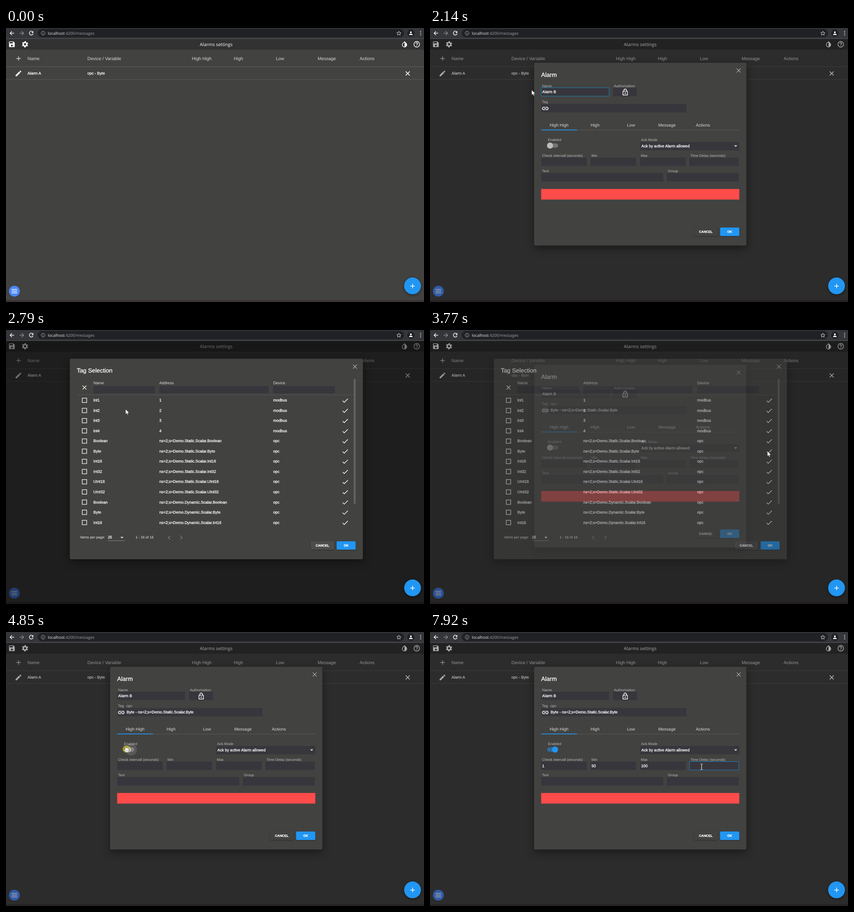
Recreate the animation shown at these times as an HTML page. Size 923 by 606 pixels, loop 8 s.

```html
<!DOCTYPE html>
<html lang="en">
<head>
<meta charset="utf-8">
<title>Alarms settings</title>
<style>
  html, body { margin: 0; width: 100%; height: 100%; overflow: hidden; background: #424241; }
  svg { display: block; width: 923px; height: 606px; }
  text { font-family: "Liberation Sans", Arial, sans-serif; white-space: pre; text-rendering: geometricPrecision; }
  .ui { font-family: "Open Sans", "Noto Sans", sans-serif; }
  .value { stroke: #fff; stroke-width: .3; }
  .dialog { transform-box: fill-box; transform-origin: center; }
  .dialog > .panel { filter: drop-shadow(0 7px 9px rgba(0, 0, 0, .4)); }
</style>
</head>
<body>
<svg id="stage" viewBox="0 0 923 606"></svg>
<script>
const LOOP = 8000, BLUE = '#2196f3', FIELD = '#37363c', LABEL = '#b9b9b9';
const stage = document.getElementById('stage');
const $ = id => document.getElementById(id);

// Markup helpers
const text = (x, y, s, size = 8.6, fill = '#fff', extra = '') =>
  `<text x="${x}" y="${y}" font-size="${size}" fill="${fill}" ${extra}>${s}</text>`;
const value = (x, y, s, size = 8.6) => text(x, y, s, size, '#fff', 'class="value"');
const label = (x, y, s) => text(x, y, s, 8, LABEL);
const middle = (x, y, s, size, fill, extra = '') =>
  text(x, y, s, size, fill, 'text-anchor="middle" ' + extra);
const rect = (x, y, x2, y2, fill, extra = '') =>
  `<rect x="${x}" y="${y}" width="${x2 - x}" height="${y2 - y}" fill="${fill}" ${extra}/>`;
const circle = (x, y, r, fill, extra = '') => `<circle cx="${x}" cy="${y}" r="${r}" fill="${fill}" ${extra}/>`;
const line = (d, w = 1.4, color = '#fff', extra = '') =>
  `<path d="${d}" fill="none" stroke="${color}" stroke-width="${w}" ${extra}/>`;
const cross = (x, y, r, w, color) => line(`M${x - r} ${y - r}l${2 * r} ${2 * r}m0 ${-2 * r}l${-2 * r} ${2 * r}`, w, color);
const plus = (x, y, r, w, color) => line(`M${x - r} ${y}h${2 * r}M${x} ${y - r}v${2 * r}`, w, color);
const icon = (x, y, body, scale = .7) => `<g transform="translate(${x} ${y}) scale(${scale}) translate(-12 -12)">${body}</g>`;
const solid = d => `<path d="${d}" fill="#fff" fill-rule="evenodd"/>`;
const caretDown = (x, y) => `<path d="M${x - 3.5} ${y}h7l-3.5 3.5z" fill="#ddd"/>`;
const button = (x, y, x2, s, fill) =>
  rect(x, y, x2, y + 18.6, fill, 'rx="2" style="filter:drop-shadow(0 1px 1px rgba(0,0,0,.35))"') +
  middle((x + x2) / 2, y + 12, s, 7.15, '#fff', 'font-weight="bold" class="value"');

const browserBar = () =>
  rect(0, 0, 923, 23, '#35363a') + rect(0, 23, 923, 24, '#56575a') +
  rect(70, 2, 879, 20.5, '#202124', 'rx="9.2"') +
  line('M18 11.5H9m4.3-4.3L9 11.5l4.3 4.3', 1.5, '#eee') +
  line('M30 11.5h9m-4.3-4.3l4.3 4.3-4.3 4.3', 1.5, '#85868a') +
  line('M59 8.6A4.2 4.2 0 1 0 59.8 12.6', 1.5, '#eee') +
  '<path d="M60.4 6.6v4.4h-4.4z" fill="#eee"/>' +
  circle(82, 11.5, 4.2, 'none', 'stroke="#a5a8ad"') + line('M82 11v3M82 8.8v1.1', 1, '#a5a8ad') +
  text(92.5, 14.6, 'localhost<tspan fill="#9aa0a6">:4200/messages</tspan>', 8.8, '#f0f0f0', 'class="ui"') +
  line('M867.5 7l1.4 3 3.2.4-2.4 2.2.7 3.2-2.9-1.6-2.9 1.6.7-3.2-2.4-2.2 3.2-.4z', 1, '#ddd') +
  circle(894, 11.5, 8, '#1f2023') + circle(894, 9.6, 2, '#fff') +
  '<path d="M890 15.4q0-2.8 4-2.8t4 2.8z" fill="#fff"/>' +
  [7.7, 11.5, 15.3].map(y => circle(915.5, y, 1.1, '#ddd')).join('');

const page = () =>
  rect(0, 24, 923, 606, '#424241') + rect(0, 24, 923, 48, '#323232') + rect(0, 602, 923, 606, '#3a3336') +
  icon(13, 36, solid('M17 3H5a2 2 0 0 0-2 2v14a2 2 0 0 0 2 2h14a2 2 0 0 0 2-2V7zM12 19a3 3 0 1 1 0-6 3 3 0 0 1 0 6zM15 9H5V5h10z')) +
  icon(42, 36, circle(12, 12, 5.4, 'none', 'stroke="#fff" stroke-width="4"') +
    circle(12, 12, 8, 'none', 'stroke="#fff" stroke-width="3.8" pathLength="12" stroke-dasharray="1 1" transform="rotate(15 12 12)"')) +
  icon(880, 36, solid('M12 2.3L6.3 8a8 8 0 1 0 11.4 0zM12 19.6a6 6 0 0 1-4.2-10.3L12 5.1z')) +
  circle(907, 36, 6.2, 'none', 'stroke="#fff" stroke-width="1.4"') +
  line('M905 34.6a2 2 0 1 1 3.2 1.5q-1.2.8-1.2 2M907 38.7v1.4', 1.3) +
  middle(464.2, 39.7, 'Alarms settings', 10.1, '#fff', 'class="ui"') +
  plus(27.7, 67.5, 4.9, 1.3, '#d8d8d8') +
  [[47.5, 'Name'], [179.8, 'Device / Variable'], [410.5, 'High High'], [503, 'High'], [596, 'Low'], [688.3, 'Message'], [781, 'Actions']]
    .map(([x, s]) => text(x, 70.8, s, 9.95, '#d8d8d8')).join('') +
  rect(0, 85, 923, 86, '#5b5b5a') + rect(0, 113.3, 923, 114.3, '#5b5b5a') +
  icon(27.5, 100.5, solid('M3 17.2V21h3.8L17.8 9.9l-3.7-3.7zM20.7 7a1 1 0 0 0 0-1.4l-2.3-2.3a1 1 0 0 0-1.4 0l-1.9 1.8 3.8 3.8z')) +
  value(47.5, 103.1, 'Alarm A') + value(179.8, 103.1, 'opc - Byte') +
  cross(887, 100.5, 4.4, 1.6, '#fff') +
  circle(18.5, 582, 12, '#4a87f7') + line('M12.3 578.3h12.4M12.3 582h12.4M12.3 585.7h12.4', 1.4);

const fab = () =>
  circle(897.7, 570.3, 18.5, BLUE, 'style="filter:drop-shadow(0 2px 3px rgba(0,0,0,.4))"') +
  circle(897.7, 570.3, 18.5, '#fff', 'id="fabRipple"') + plus(897.7, 570.7, 4.9, 1.4, '#fff');

// Editable fields: typed = [time, content], caret = visible intervals
const fields = [
  { id: 'name', x: 245.5, y: 132, x2: 395.5, focus: [790, 2450],
    typed: [[1330, 'A'], [1410, 'Al'], [1490, 'Ala'], [1580, 'Alar'], [1660, 'Alarm'], [1740, 'Alarm '], [1900, 'Alarm B']],
    caret: [[790, 1080], [1330, 1900]] },
  { id: 'interval', x: 245.5, y: 286.5, x2: 346, focus: [5260, 5820], typed: [[5500, '1']], caret: [[5260, 5740]] },
  { id: 'min', x: 354.5, y: 286.5, x2: 455, focus: [5820, 6800], typed: [[6480, '5'], [6640, '50']], caret: [[5820, 6320], [6480, 6720]] },
  { id: 'max', x: 464, y: 286.5, x2: 564.5, focus: [6800, 7700], typed: [[7280, '1'], [7520, '10'], [7600, '100']], caret: [[6800, 7030]] },
  { id: 'delay', x: 573, y: 286.5, x2: 682, focus: [7700, LOOP], typed: [], caret: [[7700, 7900]] }
];

const alarmDialog = () =>
  rect(230, 77, 698.5, 481, '#424241', 'rx="3" class="panel"') +
  value(245.5, 107.7, 'Alarm', 13.2) + cross(681.5, 94, 4.3, 1.2, '#b5b5b5') +
  [[247.5, 130.6, 'Name'], [406, 130.6, 'Authorization'], [247.3, 166.2, 'Tag'], [260.5, 250, 'Enabled'], [466.3, 250, 'Ack Mode'],
   [247.5, 284.6, 'Check intervall (seconds)'], [356.5, 284.6, 'Min'], [465.5, 284.6, 'Max'], [575, 284.6, 'Time Delay (seconds)'],
   [247.5, 318.8, 'Text'], [525.3, 318.8, 'Group']].map(l => label(...l)).join('') +
  [[404, 132, 457, 151], [245.5, 168, 566.5, 186.5], [464, 252, 683, 270.5], [245.5, 320.7, 515, 339.5], [523, 320.7, 682, 339.5]]
    .map(r => rect(...r, FIELD)).join('') +
  fields.map(f => rect(f.x, f.y, f.x2, f.y + 18.7, FIELD) + rect(f.x, f.y, f.x2, f.y + 18.7, 'none', `id="${f.id}Focus" stroke="#1e7fba"`) +
    value(f.x + 2.3, f.y + 12.2, '').replace('<text', `<text id="${f.id}Text"`) +
    rect(0, f.y + 4, 1, f.y + 14.3, '#fff', `id="${f.id}Caret"`)).join('') +
  icon(431, 142, line('M8 9V6a4 4 0 0 1 8 0v3M5 9h14v12H5z', 2) + circle(12, 15, 2, '#fff')) +
  circle(254.5, 178, 9, '#fff', 'id="linkRipple" opacity=".1"') +
  icon(254.5, 178, line('M11 8H7a4 4 0 0 0 0 8h4M13 8h4a4 4 0 0 1 0 8h-4M8 12h8', 2)) +
  `<g id="tag">${label(266, 166.2, 'opc') + value(266.3, 180.2, 'Byte - ns=2;s=Demo.Static.Scalar.Byte')}</g>` +
  ['High High', 'High', 'Low', 'Message', 'Actions'].map((s, i) => middle(285 + 79.4 * i, 217.8, s, 9.5, '#d8d8d8')).join('') +
  rect(245.5, 225.5, 683, 226.3, '#5e5e5e') + rect(245.5, 224.6, 324.7, 226.2, BLUE) +
  rect(258.7, 255.2, 283, 264.8, '#737373', 'id="track" rx="4.8"') +
  circle(276, 260, 13, '#fff', 'id="toggleRipple"') + circle(0, 260, 6.7, '#bdbdbd', 'id="thumb"') +
  value(466.7, 264, 'Ack by active Alarm allowed') + caretDown(675, 259.5) +
  rect(245.5, 356, 683, 379.5, '#ff4b49') +
  button(583, 441.3, 635, 'CANCEL', '#424241') + button(640.5, 441.3, 683, 'OK', BLUE);

const scalars = 'Boolean Byte Int16 Int32 UInt16 UInt32'.split(' ');
const tags = [
  ...[1, 2, 3, 4].map(n => ['int' + n, n, 'modbus']),
  ...scalars.map(s => [s, 'ns=2;s=Demo.Static.Scalar.' + s, 'opc']),
  ...scalars.slice(0, 3).map(s => [s, 'ns=2;s=Demo.Dynamic.Scalar.' + s, 'opc'])
];

const tagDialog = () =>
  rect(141, 63.5, 788, 507, '#424241', 'rx="3" class="panel"') +
  value(156.5, 94.4, 'Tag Selection', 13.1) + cross(770.5, 81, 4.3, 1.2, '#b5b5b5') + cross(173.3, 127.3, 4.3, 1.3, '#fff') +
  [[193, 329, 'Name'], [338.5, 580, 'Address'], [590, 726, 'Device']]
    .map(([x, x2, s]) => text(x, 119.8, s, 8.7, '#e0e0e0') + rect(x, 124, x2, 140, FIELD)).join('') +
  rect(157, 143, 768, 144, '#545454') + rect(767.7, 108.5, 772, 384, '#626262') +
  tags.map(([name, address, device], i) => {
    const y = 155.3 + 22.52 * i;
    return rect(168.4, y - 4.7, 178.2, y + 5.1, 'none', 'stroke="#e8e8e8" stroke-width="1.4"') +
      value(193, y + 3, name) + value(338.5, y + 3, address) + value(590, y + 3, device) +
      icon(749, y + .7, solid('M9 16.2L4.8 12l-1.4 1.4L9 19 21 7l-1.4-1.4z'));
  }).join('') +
  text(164, 460.6, 'Items per page:', 7.9, '#eee') + value(225, 460.6, '25', 8.2) +
  text(286, 460.6, '1 - 16 of 16', 7.9, '#eee') +
  caretDown(256, 457.5) + rect(225, 465.5, 262, 466.4, '#909090') +
  line('M362.5 455l-4 4.2 4 4.2M385 455l4 4.2-4 4.2', 1.2, '#858585') +
  button(673, 467.2, 724.5, 'CANCEL', '#4d4d4d') + button(730, 467.2, 772, 'OK', BLUE);

const pointers = {
  arrow: '<path d="M0 0v11.3l2.6-2.4 1.7 4 1.9-.8-1.7-3.9h3.6z" fill="#fff" stroke="#222" stroke-width=".6"/>',
  beam: line('M-2.6-6.5q2.6 0 2.6 1.4v10.2q0 1.4-2.6 1.4M2.6-6.5q-2.6 0-2.6 1.4v10.2q0 1.4 2.6 1.4', 1, '#ddd'),
  hand: '<path d="M-3-6.5q1.2-1.4 2.2 0v4q1.4-1 2.2.4 1.4-.8 2.1.5 1.6-.4 2 1v4.1l-1.3 3.5h-6l-3.6-5.3q-.2-1.8 2.4-.4z" fill="#fff" stroke="#333" stroke-width=".7"/><path d="M-.6 2v3M1.3 2v3M3.1 2v3" stroke="#666" stroke-width=".6"/>'
};

// Pointer path: time, x, y, shape from that time on
const path = [
  [200, 896, 570, 'hand'], [480, 896, 570, 'arrow'], [740, 300, 141, 'beam'], [820, 300, 141, 'arrow'],
  [920, 224.5, 137, 'arrow'], [2200, 224.5, 137, 'arrow'], [2400, 254, 178, 'hand'], [2560, 254, 178, 'arrow'],
  [2700, 264, 175, 'arrow'], [2900, 264, 175, 'arrow'], [3500, 745, 268, 'arrow'], [3900, 745, 268, 'arrow'],
  [4500, 266, 259, 'hand'], [4980, 266, 259, 'arrow'], [5180, 275, 296, 'beam'], [5560, 275, 296, 'beam'],
  [5780, 366, 291, 'beam'], [6320, 366, 291, ''], [6640, 366, 291, 'beam'], [6790, 485, 297, 'beam'],
  [7520, 485, 297, 'beam'], [7680, 599.7, 298, 'beam'], [LOOP, 599.7, 298, 'beam']
];
const clicks = [200, 770, 2420, 3600, 4760, 5230, 5800, 6780, 7690];

stage.innerHTML = browserBar() + page() + rect(0, 24, 923, 606, '#000', 'id="shade1"') +
  `<g id="alarm" class="dialog">${alarmDialog()}</g>` + rect(0, 24, 923, 606, '#000', 'id="shade2"') +
  `<g id="selection" class="dialog">${tagDialog()}</g>` + fab() +
  `<g id="pointer">${circle(-.5, 0, 8, '#c8be14', 'id="click" opacity=".72"')}` +
  Object.entries(pointers).map(([k, body]) => `<g id="${k}">${body}</g>`).join('') + '</g>';

const ramp = (t, start, length) => Math.min(1, Math.max(0, (t - start) / length));
const easeOut = k => 1 - (1 - k) ** 3;
const smooth = k => k * k * (3 - 2 * k);
const within = (t, [a, b]) => t >= a && t < b;
const show = (id, on) => { $(id).style.display = on ? '' : 'none'; };
const fade = (id, opacity) => { $(id).style.opacity = opacity; };

function drawDialog(id, shade, t, open, close) {
  const k = easeOut(ramp(t, open, 150)), gone = ramp(t, close, 75);
  show(id, t > open && gone < 1);
  fade(id, k * (1 - gone));
  $(id).style.transform = `scale(${.7 + .3 * k})`;
  fade(shade, .33 * easeOut(ramp(t, open, 400)) * (1 - easeOut(ramp(t, close, 120))));
}

function drawField(f, t) {
  const content = f.typed.filter(([at]) => t >= at).pop();
  const el = $(f.id + 'Text');
  el.textContent = content ? content[1] : '';
  show(f.id + 'Focus', within(t, f.focus));
  show(f.id + 'Caret', f.caret.some(c => within(t, c)));
  $(f.id + 'Caret').setAttribute('x', f.x + 2.7 + (content ? el.getComputedTextLength() : 0));
}

function drawPointer(t) {
  const i = path.findIndex((p, n) => n + 1 < path.length && within(t, [p[0], path[n + 1][0]]));
  show('pointer', i >= 0);
  if (i < 0) return;
  const [t0, x0, y0, shape] = path[i], [t1, x1, y1] = path[i + 1];
  const k = smooth(ramp(t, t0, t1 - t0));
  $('pointer').setAttribute('transform', `translate(${x0 + (x1 - x0) * k} ${y0 + (y1 - y0) * k})`);
  for (const name in pointers) show(name, name === shape);
  show('click', clicks.some(c => within(t, [c, c + 160])));
}

function draw(t) {
  drawDialog('alarm', 'shade1', t, 230, LOOP);
  drawDialog('selection', 'shade2', t, 2480, 3740);
  fields.forEach(f => drawField(f, t));
  drawPointer(t);
  show('tag', t >= 3740);
  const on = smooth(ramp(t, 4800, 120));
  $('thumb').setAttribute('cx', 265 + 11 * on);
  $('thumb').setAttribute('fill', on > .5 ? BLUE : '#bdbdbd');
  $('track').setAttribute('fill', on > .5 ? '#316a9b' : '#737373');
  fade('toggleRipple', t < 4780 ? 0 : .12 * (1 - ramp(t, 5200, 250)));
  fade('linkRipple', t < 2420 ? 0 : .1 * (1 - ramp(t, 3850, 200)));
  fade('fabRipple', t < 200 ? 0 : .13 * (1 - ramp(t, 450, 250)));
}

function tick() {
  draw(performance.now() % LOOP);
  requestAnimationFrame(tick);
}
tick();
</script>
</body>
</html>
```
